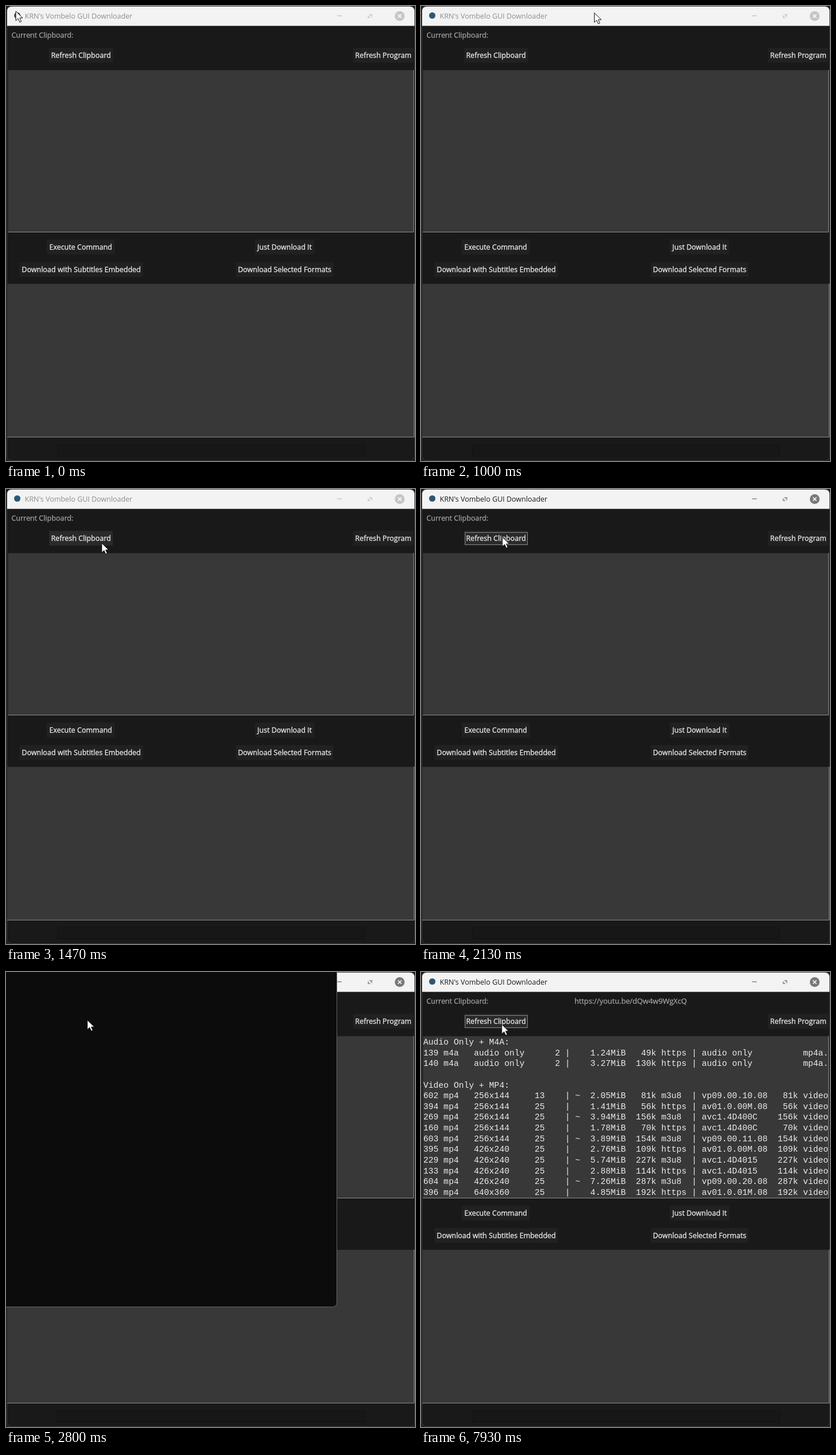
An HTML page that plays this animation: 709x790 px, repeating every 8 s.

```html
<!DOCTYPE html>
<html lang="en">
<head>
<meta charset="utf-8">
<title>Downloader</title>
<style>
  html, body { margin: 0; width: 100%; height: 100%; overflow: hidden; background: #202020; }
  svg { display: block; width: 709px; height: 790px; font: 12.45px "Open Sans", "Noto Sans", sans-serif; }
  .mono { font: 14.63px "Liberation Mono", monospace; fill: #ececec; white-space: pre; }
  .label { fill: #a6a6a6; stroke: #a6a6a6; stroke-width: .25; }
  #url { font-size: 12.75px; }
  .button rect { fill: #212121; stroke: #1c1c1c; }
  .button text { fill: #ececec; stroke: #ececec; stroke-width: .3; text-anchor: middle; }
  .button.hover rect { fill: #2a2a2a; }
  #title { fill: #8e8e8e; }
  #controls { fill: #d2d2d2; }
  #controls circle { fill: #c5c5c5; }
  .active #title { fill: #191919; }
  .active #controls { fill: #a2a2a2; }
  .active #controls circle { fill: #797979; }
</style>
</head>
<body>
<svg id="stage" viewBox="0 0 709 790">
  <rect x="1.5" y=".5" width="707" height="789" rx="8" fill="#191919" stroke="#3b3b3b"/>
  <path d="M2 34.500V9Q2 1 10 1H700Q708 1 708 9V34.500Z" fill="#f3f3f3"/>
  <circle cx="19.5" cy="16.5" r="5.5" fill="#2c5878"/>
  <text id="title" x="32.5" y="22">KRN's Vombelo GUI Downloader</text>
  <g id="controls">
    <path d="M574 16H582V18H574ZM629 14H635V20ZM627 15.500V21H632.500Z"/>
    <circle cx="682.5" cy="17.5" r="8.5"/>
    <path d="M679.500 14.500L685.500 20.500M685.500 14.500L679.500 20.500" stroke="#fff" stroke-width="1.6"/>
  </g>
  <text class="label" x="9.500" y="55">Current Clipboard:</text>

  <rect x="3" y="111" width="704" height="282" fill="#383838"/>
  <path d="M3.500 392V111.500H706" fill="none" stroke="#2a2a2a"/>
  <path d="M3 392.500H706.500V111" fill="none" stroke="#8c8c8c"/>
  <rect x="2" y="482" width="706" height="267" fill="#383838"/>
  <path d="M2.500 748V482.500H707" fill="none" stroke="#2a2a2a"/>
  <path d="M2 748.500H707.500V482" fill="none" stroke="#8c8c8c"/>
  <rect x="89.500" y="761.500" width="532" height="20" fill="#171717" stroke="#121212"/>

  <g id="buttons"></g>
  <rect id="focus" x="76.500" y="75.500" width="108" height="21" fill="none" stroke="#ddd" stroke-dasharray="1 1"/>
  <g id="result">
    <text id="url" class="label" x="266" y="55">https://youtu.be/dQw4w9WgXcQ</text>
    <clipPath id="listClip"><rect x="3" y="112" width="703" height="280"/></clipPath>
    <g id="list" clip-path="url(#listClip)"></g>
  </g>
  <path id="terminal" d="M-1 -1H573.500V573.500Q573.500 581.500 565.500 581.500H-1Z" stroke="#656565"/>
  <path id="cursor" d="M0 0V16.500L4 12.800L6.800 19L9.500 17.800L6.800 11.800H12Z" fill="#fff" stroke="#111"/>
</svg>
<script>
const $ = id => document.getElementById(id);

function add(parent, tag, attrs, text = "") {
  const el = document.createElementNS("http://www.w3.org/2000/svg", tag);
  for (const k in attrs) el.setAttribute(k, attrs[k]);
  el.textContent = text;
  return parent.appendChild(el);
}

function button(x, y, w, label) {
  const g = add($("buttons"), "g", { class: "button" });
  add(g, "rect", { x: x + .5, y: y + .5, width: w - 1, height: 26 });
  add(g, "text", { x: x + w / 2, y: y + 18 }, label);
  return g;
}

const refresh = button(74, 72, 112, "Refresh Clipboard");
button(601, 72, 106, "Refresh Program");
button(70, 405, 119, "Execute Command");
button(431, 405, 104, "Just Download It");
button(23, 444, 215, "Download with Subtitles Embedded");
button(398, 444, 170, "Download Selected Formats");

const audio = (id, size, rate) =>
  `${id} m4a   audio only      2 |    ${size}MiB ${rate.padStart(4)}k https | audio only          mp4a.40.2`;

function video(row) {
  const [id, res, fps, size, rate, proto, codec] = row.split(" ");
  const kbps = rate.padStart(3) + "k";
  return `${id} mp4   ${res}     ${fps}    | ${proto == "m3u8" ? "~" : " "}  ${size}MiB  ` +
    `${kbps} ${proto.padEnd(5)} | ${codec.padEnd(15)}${kbps} video only`;
}

const lines = [
  "Audio Only + M4A:",
  audio(139, "1.24", "49"),
  audio(140, "3.27", "130"),
  "",
  "Video Only + MP4:",
  ...[
    "602 256x144 13 2.05 81 m3u8 vp09.00.10.08",
    "394 256x144 25 1.41 56 https av01.0.00M.08",
    "269 256x144 25 3.94 156 m3u8 avc1.4D400C",
    "160 256x144 25 1.78 70 https avc1.4D400C",
    "603 256x144 25 3.89 154 m3u8 vp09.00.11.08",
    "395 426x240 25 2.76 109 https av01.0.00M.08",
    "229 426x240 25 5.74 227 m3u8 avc1.4D4015",
    "133 426x240 25 2.88 114 https avc1.4D4015",
    "604 426x240 25 7.26 287 m3u8 vp09.00.20.08",
    "396 640x360 25 4.85 192 https av01.0.01M.08"
  ].map(video)
];
lines.forEach((s, i) => add($("list"), "text", { class: "mono", x: 4, y: 126 + i * 18.64 }, s));

const smooth = u => u * u * (3 - 2 * u);
const easeOut = u => 1 - (1 - u) ** 2;
// Cursor moves: start tick, end tick, target x, target y, easing
const moves = [
  [9, 15, 300.5, 12, smooth],
  [16, 22, 166, 94, smooth],
  [22, 26, 141, 83.5, easeOut],
  [118, 119, 140, 91, smooth]
];

function cursorAt(tick) {
  let x = 17, y = 9;
  for (const [start, end, toX, toY, ease] of moves) {
    const u = ease(Math.min(1, Math.max(0, (tick - start) / (end - start))));
    x += (toX - x) * u;
    y += (toY - y) * u;
  }
  return [x, y];
}

const show = (id, on) => $(id).setAttribute("visibility", on ? "visible" : "hidden");

function draw(now) {
  const tick = Math.floor(now % 8000 * 15 / 1000 + .1); // screen refreshes 15 times a second
  const [x, y] = cursorAt(tick);
  $("cursor").setAttribute("transform", `translate(${x} ${y})`);
  refresh.classList.toggle("hover", x > 74 && x < 186 && y > 72 && y < 98);
  $("stage").classList.toggle("active", tick >= 32);
  show("focus", tick >= 32);
  show("terminal", tick >= 41 && tick < 107);
  $("terminal").setAttribute("fill", tick >= 42 ? "#0c0c0c" : "none");
  show("result", tick >= 107);
}

const begin = performance.now();
function loop() {
  draw(performance.now() - begin);
  requestAnimationFrame(loop);
}
loop();
</script>
</body>
</html>
```
